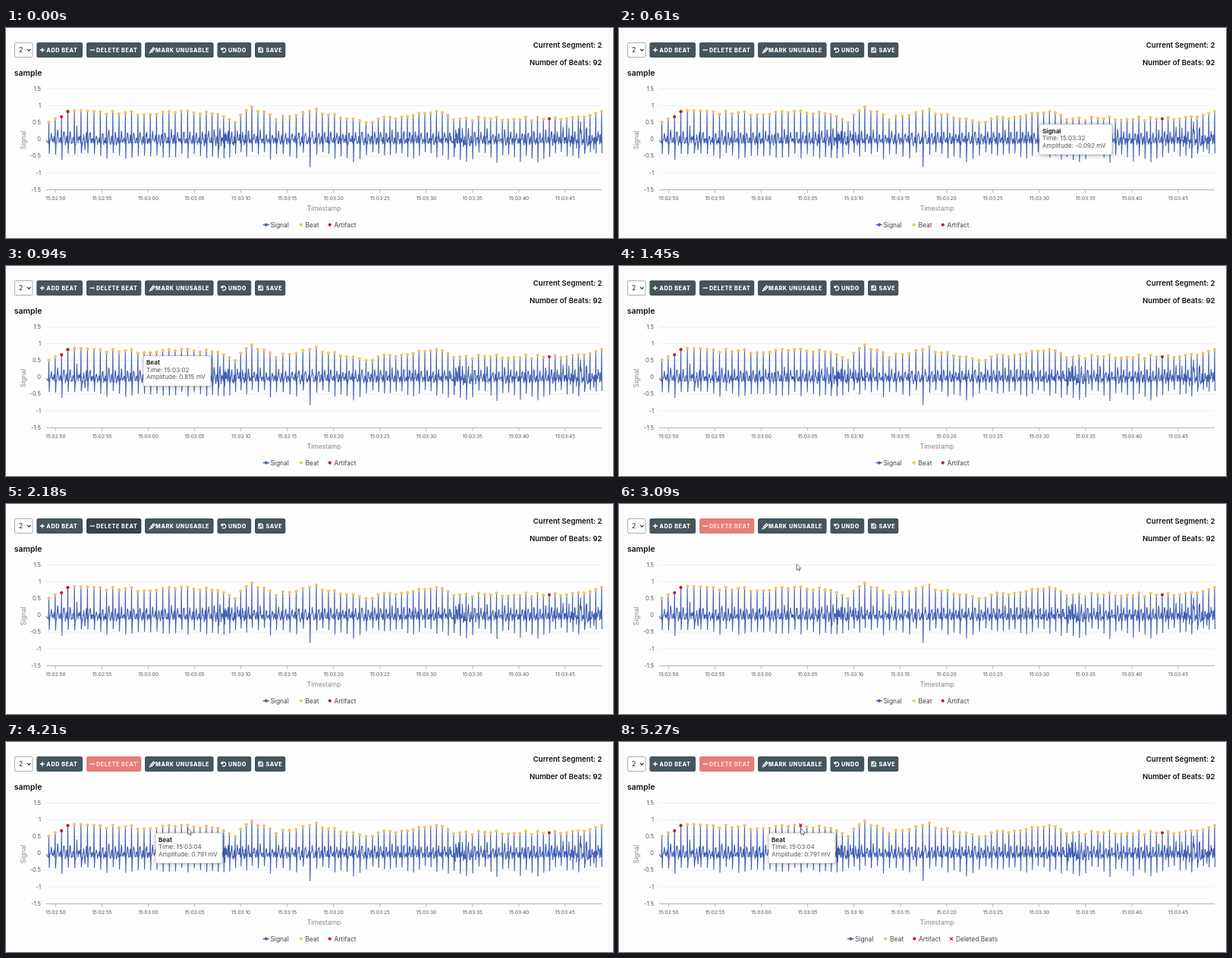
Recreate the animation shown at these times as an HTML page. Size 800x277 px, loop 5850 ms.

```html
<!DOCTYPE html>
<html lang="en">
<head>
<meta charset="utf-8">
<title>Signal editor</title>
<style>
html, body { margin: 0; width: 100%; height: 100%; overflow: hidden; background: #fdfdfd; }
svg { display: block; width: 800px; height: 277px; font-family: Inter, "Open Sans", sans-serif; }
.head { font-weight: 600; font-size: 9.6px; fill: #111; }
.sample { font-size: 10.5px; }
.btn text { font-weight: 800; font-size: 7.2px; letter-spacing: .6px; fill: #fff; }
.btn path { fill: none; stroke: #fff; stroke-width: 1.3; }
.btn.red text { fill: #fbdad6; }
.axis { font-size: 7.5px; fill: #55575e; }
.time { font-size: 6.5px; }
.name { font-size: 8.5px; fill: #85878d; }
.legend { font-size: 8.4px; fill: #444; }
#tip { font-size: 8.1px; fill: #555; }
#tip rect { fill: #fff; stroke: #777; stroke-opacity: .55; stroke-width: .7; filter: drop-shadow(1px 1px 3px rgba(0,0,0,.25)); }
#tip .title { font-weight: 700; fill: #222; }
</style>
</head>
<body>
<svg id="stage" viewBox="0 0 800 277"></svg>
<script>
const LOOP = 5850;
const BLUE = '#4060b4', GOLD = '#f0c468', RED = '#d0122b', SLATE = '#46545c';
const stage = document.getElementById('stage');

function add(tag, attrs, parent = stage, content) {
  const el = document.createElementNS('http://www.w3.org/2000/svg', tag);
  for (const k in attrs) el.setAttribute(k, attrs[k]);
  if (content !== undefined) el.textContent = content;
  parent.appendChild(el);
  return el;
}
const text = (x, y, s, cls, parent, anchor = 'start') =>
  add('text', { x, y, class: cls, 'text-anchor': anchor }, parent, s);
const line = (d, stroke, width = 1, parent) =>
  add('path', { d, stroke, 'stroke-width': width, fill: 'none' }, parent);
const dot = (cx, cy, fill, parent) => add('circle', { cx, cy, r: 2.1, fill }, parent);
const cross = (x, y, parent) =>
  line(`M${x - 2} ${y - 2}l4 4m0 -4l-4 4`, '#c3131f', 1.3, parent);

// Interpolates rows of [key, ...values]
const smooth = f => f * f * (3 - 2 * f);
function between(rows, key, ease = f => f) {
  let k = 1;
  while (k < rows.length - 1 && rows[k][0] < key) k++;
  const a = rows[k - 1], b = rows[k];
  const f = ease(Math.min(1, Math.max(0, (key - a[0]) / (b[0] - a[0]))));
  return a.slice(1).map((v, i) => v + (b[i + 1] - v) * f);
}

// Toolbar
add('rect', { x: 11.5, y: 19.5, width: 23.5, height: 19, rx: 1.5, fill: '#fff', stroke: '#999', 'stroke-width': .8 });
add('text', { x: 17, y: 32, 'font-size': 8.6, fill: '#222' }, stage, '2');
line('M28 27.8l2.2 2.4l2.2 -2.4', '#222', 1.1);

function button(x, width, label, icon, inset = 13) {
  const g = add('g', { class: 'btn' });
  const box = add('rect', { x, y: 19, width, height: 20, rx: 2.5, fill: SLATE }, g);
  add('path', { d: icon, transform: `translate(${x + 4.5} 29)` }, g);
  text(x + inset, 31.6, label, '', g);
  return { g, box };
}
button(40.3, 60.7, 'ADD BEAT', 'M0 0h6m-3 -3v6');
const del = button(106, 72.3, 'DELETE BEAT', 'M0 0h6.5');
button(183, 90.6, 'MARK UNUSABLE', 'M1 3.5h2.5M3 1.5l3.8 -4.5l1.8 1.6l-4 4.2zM5 -1l2 1.8', 14);
button(278.5, 44.7, 'UNDO', 'M1 -3v2.7h2.7M1.3 -.6a2.8 2.8 0 1 1 .7 2.9', 14.5);
button(328, 40.3, 'SAVE', 'M.5 -2.8h4l1.4 1.4v4.2h-5.4zM1.5 -2.5v1.8h2.4M2.2 1.4h2', 14.5);

text(785.5, 25.8, 'Current Segment: 2', 'head', stage, 'end');
text(785.5, 49, 'Number of Beats: 92', 'head', stage, 'end');
text(10.8, 62.8, 'sample', 'head sample');

// Axes
const yOf = v => 146.8 - 44.2 * v;
for (let v = -1.5; v <= 1.5; v += .5) {
  line(`M53 ${yOf(v)}H785`, '#e9ebf0', .8);
  text(46, yOf(v) + 2.5, v, 'axis', stage, 'end');
}
line('M53 213.5H785', '#9a9ca1', .7);
for (let i = 0; i < 12; i++) {
  const x = 65.4 + 61.05 * i, s = 170 + 5 * i;
  line(`M${x} 213.5v4`, '#9a9ca1', .7);
  text(x, 227.3, `15:0${Math.floor(s / 60)}:${String(s % 60).padStart(2, '0')}`, 'axis time', stage, 'middle');
}
text(419, 241.3, 'Timestamp', 'name', stage, 'middle');
add('text', { transform: 'translate(25.5 148) rotate(-90)', 'text-anchor': 'middle', class: 'name' }, stage, 'Signal');

let seed = 92;
const rnd = () => (seed = (seed * 16807) % 2147483647) / 2147483647;
const bump = (x, mid, w) => Math.exp(-(((x - mid) / w) ** 2));

// Beats between a few [index, x, peak] anchors
const COUNT = 92, picked = 22, artifacts = [2, 3, 82];
const anchors = [[0, 56.5, 127], [3, 81.5, 112], [7, 116, 110], [15, 182, 113], [25, 264, 111],
  [30, 302, 123], [33, 324, 105], [37, 356, 120], [43, 409, 108], [48, 449, 122], [52, 483, 122],
  [64, 575, 110], [66, 590, 121], [71, 631, 120], [82, 716, 120], [91, 785, 112]];
const beats = Array.from({ length: COUNT }, (_, i) => {
  const [x, y] = between(anchors, i);
  return { x, y: y + 6 * (rnd() - .5) };
});

const roughness = x => .13 + .22 * (bump(x, 95, 6) + bump(x, 285, 9) + bump(x, 592, 14) + bump(x, 758, 22));
let d = 'M53 148';
const put = (x, y) => { d += `L${x.toFixed(1)} ${y.toFixed(1)}`; };
beats.forEach(({ x, y }, i) => {
  put(x - .5, yOf(-.12));
  put(x, y);
  put(x + .5, yOf(-.38 - .2 * rnd() - .4 * rnd() ** 12));
  const gap = i < COUNT - 1 ? beats[i + 1].x - x : 0;
  for (let f = .14; f < .92 && gap; f += .06) {
    const wave = .3 * bump(f, .38, .11) + .14 * bump(f, .8, .07) - .09;
    put(x + gap * f, yOf(wave + (rnd() + rnd() - 1) * roughness(x)));
  }
});
add('path', { d, fill: 'none', stroke: BLUE, 'stroke-width': 1.1, 'stroke-linejoin': 'bevel' });

const dots = beats.map(({ x, y }, i) => dot(x, y, artifacts.includes(i) ? RED : GOLD));
const mark = cross(beats[picked].x, beats[picked].y);

// Legends before and after the deletion
function legend(x, extra) {
  const g = add('g', { class: 'legend' });
  line(`M${x - 4} 259.6h8.5`, BLUE, 1.2, g);
  [['Signal', BLUE, 0], ['Beat', GOLD, 46], ['Artifact', RED, 84]].forEach(([label, color, dx]) => {
    dot(x + dx + .3, 259.6, color, g);
    text(x + dx + 6, 262.6, label, '', g);
  });
  if (extra) {
    cross(x + 133, 259.6, g);
    text(x + 139, 262.6, 'Deleted Beats', '', g);
  }
  return g;
}
const shortLegend = legend(342.5, false), longLegend = legend(305, true);

// Tooltip and pointer
const tip = add('g', { id: 'tip' });
const tipBox = add('rect', { x: 0, y: 0, height: 40, rx: 2 }, tip);
const tipText = [0, 1, 2].map(i => text(4, 11.5 + 9.6 * i, '', i ? '' : 'title', tip));
const pointer = add('path', {
  d: 'M0 0V8.2L1.9 6.5L3.2 9.2L4.5 8.6L3.2 6H5.8Z',
  fill: '#fff', stroke: '#555', 'stroke-width': .8, 'stroke-linejoin': 'round'
});

const notes = [
  { from: 340, to: 770, w: 96, rows: ['Signal', 'Time: 15:03:32', 'Amplitude: -0.092 mV'] },
  { from: 770, to: 1240, w: 89, rows: ['Beat', 'Time: 15:03:02', 'Amplitude: 0.815 mV'] },
  { from: 3520, to: LOOP, w: 88, rows: ['Beat', 'Time: 15:03:04', 'Amplitude: 0.791 mV'] }
];
const tipPath = [[620, 554, 127], [920, 181, 118.5], [1240, 181, 118.5], [1241, 197, 120]];
const pointerPath = [[2560, 142, 30], [3080, 234, 79], [3520, 239.7, 114]];

const show = (el, on) => el.setAttribute('visibility', on ? 'visible' : 'hidden');
const move = (el, path, t) => el.setAttribute('transform', `translate(${between(path, t, smooth)})`);

function draw(t) {
  const red = t >= 2560, hover = t >= 1850, deleted = t >= 5270;
  del.box.setAttribute('fill', red ? '#e67d78' : hover ? '#364148' : SLATE);
  del.g.classList.toggle('red', red);

  const note = notes.find(n => t >= n.from && t < n.to);
  show(tip, note);
  if (note) {
    move(tip, tipPath, t);
    tipBox.setAttribute('width', note.w);
    tipText.forEach((el, i) => { el.textContent = note.rows[i]; });
  }
  show(pointer, red);
  move(pointer, pointerPath, t);
  show(mark, deleted);
  show(dots[picked], !deleted);
  show(shortLegend, !deleted);
  show(longLegend, deleted);
}

const start = performance.now();
function tick() {
  draw((performance.now() - start) % LOOP);
  requestAnimationFrame(tick);
}
draw(0);
requestAnimationFrame(tick);
</script>
</body>
</html>
```
